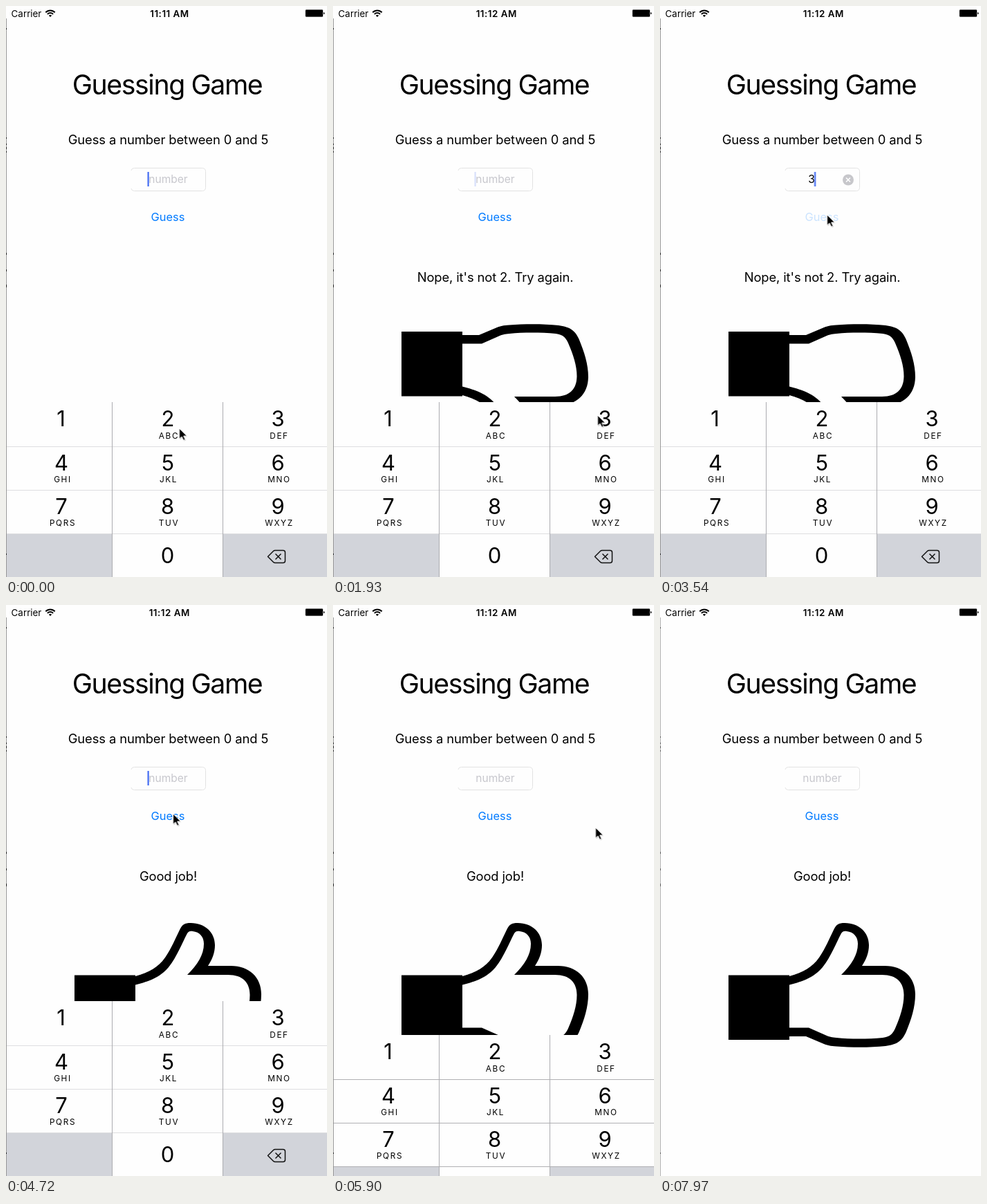
Recreate the animation shown at these times as an HTML page. Size 464 px wide and 826 px high, loop 8070 ms.

```html
<!DOCTYPE html>
<html lang="en">
<head>
<meta charset="utf-8">
<title>Guessing Game</title>
<style>
  html, body { margin: 0; width: 100%; height: 100%; overflow: hidden; background: #fefefe; }
  svg { display: block; width: 464px; height: 826px; }
  text { font-family: Inter, Roboto, "Liberation Sans", sans-serif; text-anchor: middle; }

  .title { font-size: 39.2px; letter-spacing: -1.4px; }
  .body { font-size: 18.4px; letter-spacing: -.12px; }
  .status { font-size: 13.4px; }
  .clock { font-weight: 600; letter-spacing: .5px; }
  .field { font-size: 15.5px; }
  .button { font-size: 16.4px; fill: #007aff; }
  .digit { font-size: 31px; }
  .letters { font-size: 11.8px; letter-spacing: 1.6px; }

  .anim { animation: 8070ms step-end infinite; }

  .early { animation-name: early; }
  .late { animation-name: late; }
  @keyframes early { 0% { opacity: 1 } 16.55% { opacity: 0 } }
  @keyframes late { 0% { opacity: 0 } 16.55% { opacity: 1 } }

  .hint { animation-name: hint; }
  .two { animation-name: two; }
  .three { animation-name: three; }
  @keyframes hint {
    0%, 14.7%, 45.68% { opacity: 1 }
    5.53%, 29.32% { opacity: 0 }
  }
  @keyframes two { 0%, 14.7% { opacity: 0 } 5.53% { opacity: 1 } }
  @keyframes three { 0%, 45.68% { opacity: 0 } 29.32% { opacity: 1 } }

  .caret { animation-name: caret; }
  @keyframes caret {
    0% { opacity: 1; transform: none }
    5.53% { opacity: 1; transform: translateX(18.5px) }
    10.98% { opacity: .3; transform: translateX(18.5px) }
    12.84% { opacity: 0; transform: translateX(18.5px) }
    14.7% { opacity: 1; transform: none }
    22.01% { opacity: .6; transform: none }
    23.87% { opacity: .2; transform: none }
    25.72% { opacity: 0; transform: none }
    29.32% { opacity: 1; transform: translateX(18.5px) }
    36.51% { opacity: .3; transform: translateX(18.5px) }
    38.36% { opacity: 0; transform: translateX(18.5px) }
    41.96% { opacity: 1; transform: translateX(18.5px) }
    45.68% { opacity: 1; transform: none }
    52.99% { opacity: .3; transform: none }
    54.85% { opacity: 0; transform: none }
    58.44% { opacity: 1; transform: none }
    65.75% { opacity: .3; transform: none }
    67.61% { opacity: 0; transform: none }
  }

  .button { animation-name: press; }
  @keyframes press {
    0%, 18.29%, 49.27% { opacity: 1 }
    12.84%, 43.82% { opacity: .2 }
    14.7%, 45.68% { opacity: .35 }
    16.55%, 47.53% { opacity: .75 }
  }

  .wrong { animation-name: wrong; }
  .right { animation-name: right; }
  @keyframes wrong { 0%, 45.68% { opacity: 0 } 14.7% { opacity: 1 } }
  @keyframes right { 0% { opacity: 0 } 45.68% { opacity: 1 } }

  .keypad { animation-name: dismiss; }
  @keyframes dismiss {
    0% { transform: none }
    73.06% { transform: translateY(49px) }
    74.92% { transform: translateY(221px) }
    76.65% { transform: translateY(247px) }
    78.51% { transform: translateY(260px) }
  }

  /* The hairlines look darker once the keypad moves. */
  .rows { animation-name: rows; }
  @keyframes rows { 0% { stroke: #dedee0 } 73.06% { stroke: #b0b0b3 } }

  .edge { animation-name: edge; }
  @keyframes edge { 0% { opacity: 1 } 98.71% { opacity: .75 } }

  .pointer { animation-name: pointer; }
  @keyframes pointer {
    0% { transform: translate(250.5px, 611px) }
    1.81% { transform: translate(248px, 617px) }
    3.67% { transform: translate(247px, 619px) }
    7.26% { transform: translate(246px, 600px) }
    9.12% { transform: translate(240px, 460px) }
    10.98% { transform: translate(235px, 320px) }
    12.84% { transform: translate(234.5px, 302px) }
    22.01% { transform: translate(290px, 430px) }
    23.87% { transform: translate(382.5px, 592px) }
    25.72% { transform: translate(387px, 614px) }
    27.58% { transform: translate(388px, 619px) }
    31.18% { transform: translate(384px, 608px) }
    33.04% { transform: translate(366px, 570px) }
    34.77% { transform: translate(330px, 490px) }
    36.51% { transform: translate(285px, 395px) }
    38.36% { transform: translate(252px, 325px) }
    40.1% { transform: translate(241.5px, 302px) }
    62.16% { transform: translate(268px, 307px) }
    64.01% { transform: translate(325px, 317px) }
    65.75% { transform: translate(370px, 321px) }
    67.61% { transform: translate(379.5px, 322px) }
    84.09% { transform: translate(385px, 300px) }
    85.95% { transform: translate(410px, 205px) }
    87.68% { transform: translate(434px, 105px) }
    89.54% { transform: translate(440px, 88px) }
    91.4% { transform: translate(436px, 180px) }
    93.26% { transform: translate(408px, 430px) }
    94.99% { transform: translate(354px, 812px) }
    96.85% { transform: translate(350px, 900px) }
  }
</style>
</head>
<body>
<svg viewBox="0 0 464 826" width="464" height="826">
  <defs>
    <g id="thumb">
      <path d="M99 535.500H187V629H99Z"/>
      <path fill-rule="evenodd" d="M187 537C208 531 220 524 230 510C239 497 245 482 251 470C255 462 258 460 267 460
        C288 460 302 474 302 492C302 503 298 513 292 522H325C352 522 369 539 369 563C369 582 363 600 356 617
        C350 631 342 636 326 638C303 640.500 275 640 255 638.500C246 638 242 637 237 635L211 624H187Z
        M187 549.500C208 544 222 539 235 524C247 509 254 490 262 475C264 472 266 471.500 270 472C280 473 286 480 286 490
        C286 506 277 520 262 535H321C342 535 352.500 546 352.500 564C352.500 580 347 596 341 610C337 620 333 624.500 322 626
        C300 628 275 628 255 626C248 625 246 625 241 623L215 611.500H187Z"/>
    </g>
    <g id="clear">
      <circle cx="272" cy="251.500" r="8" fill="#c7c7cb"/>
      <path d="M269 248.500l6 6m0-6l-6 6" stroke="#fff" stroke-width="1.600"/>
    </g>
  </defs>

  <rect width="464" height="826" fill="#fefefe"/>

  <!-- Status bar -->
  <text class="status" x="29.500" y="15.500">Carrier</text>
  <g fill="none" stroke="#000" stroke-width="2">
    <path d="M57.300 9.200A9.400 9.400 0 0 1 70.700 9.200M59.900 11.900A5.600 5.600 0 0 1 68.100 11.900"/>
    <path d="M64 16L61.900 13.800A3 3 0 0 1 66.100 13.800Z" fill="#000" stroke="none"/>
  </g>
  <text class="status clock anim early" x="236.500" y="15.500">11:11 AM</text>
  <text class="status clock anim late" x="236.250" y="15.500">11:12 AM</text>
  <rect x="433" y="5.500" width="25" height="10" rx="1" stroke="#000" stroke-opacity=".5" stroke-width=".6"/>
  <path d="M459 9q1.500 0 1.500 1.500T459 12Z"/>

  <!-- Game -->
  <text class="title" x="233" y="128">Guessing Game</text>
  <text class="body" x="234.500" y="200">Guess a number between 0 and 5</text>
  <path d="M181 238Q181.500 234.500 185.500 234.500H283.500Q288.500 234.500 288.500 239.500V262.500Q288.500 267.500 283.500 267.500H185.500Q181.500 267.500 181 264" fill="none" stroke="#e2e2e2"/>
  <text class="field anim hint" x="234.500" y="256" fill="#c7c7cd">number</text>
  <g class="anim two"><text class="field" x="219" y="256">2</text><use href="#clear"/></g>
  <g class="anim three"><text class="field" x="219" y="256">3</text><use href="#clear"/></g>
  <rect class="anim caret" x="204.500" y="240" width="2.200" height="21" fill="#426bf2"/>
  <text class="button anim" x="234" y="311">Guess</text>

  <g class="anim wrong">
    <text class="body" x="234.500" y="399">Nope, it's not 2. Try again.</text>
    <use href="#thumb" transform="translate(0 1100) scale(1 -1)"/>
  </g>
  <g class="anim right">
    <text class="body" x="234.500" y="399">Good job!</text>
    <use href="#thumb"/>
  </g>

  <!-- Keypad -->
  <g class="anim keypad">
    <rect y="573" width="464" height="253" fill="#fefefe"/>
    <path d="M1 764H153V826H1ZM314 764H464V826H314Z" fill="#d2d4da"/>
    <path class="anim rows" d="M1 637.500H464M1 700.500H464M1 763.500H464"/>
    <path d="M153.500 573V826M313.500 573V826" stroke="#acacb0"/>
    <g class="digit">
      <text x="79.500" y="607.500">1</text>
      <text x="234" y="607.500">2</text>
      <text x="393" y="607.500">3</text>
      <text x="80" y="671.500">4</text>
      <text x="234" y="671.500">5</text>
      <text x="393" y="671.500">6</text>
      <text x="80" y="734.500">7</text>
      <text x="233.500" y="734.500">8</text>
      <text x="393" y="734.500">9</text>
      <text x="233.500" y="806">0</text>
    </g>
    <g class="letters">
      <text x="235.500" y="625.500">ABC</text>
      <text x="395" y="625.500">DEF</text>
      <text x="82" y="688.500">GHI</text>
      <text x="235" y="688.500">JKL</text>
      <text x="395" y="688.500">MNO</text>
      <text x="82" y="751.500">PQRS</text>
      <text x="235.500" y="751.500">TUV</text>
      <text x="395" y="751.500">WXYZ</text>
    </g>
    <g fill="none" stroke="#111" stroke-width="1.500" stroke-linejoin="round">
      <path d="M378.500 796.500L386.500 788.500Q387.500 787.500 389 787.500H400.500Q403.500 787.500 403.500 790.500V802.500Q403.500 805.500 400.500 805.500H389Q387.500 805.500 386.500 804.500Z"/>
      <path d="M389.500 792.500l8 8m0-8l-8 8"/>
    </g>
  </g>

  <!-- Window edge -->
  <g class="anim edge">
    <path d="M.5 18V826" stroke="#999"/>
    <path d="M.5 32v2M.5 190v2M.5 199v2M.5 204v3M.5 210v2M.5 357v3M.5 381v3M.5 403v4M.5 792v2" stroke="#222"/>
  </g>

  <g class="anim pointer">
    <path d="M1 1.500V16.500L4.500 13.300L7 18.500L9.500 17.300L7.200 12.300H11.700Z" fill="#000" opacity=".2"/>
    <path d="M0 0V15.300L3.600 12L6 17.300L8.600 16.200L6.200 11H11Z" stroke="#fff" stroke-width="1"/>
  </g>
</svg>
</body>
</html>
```
